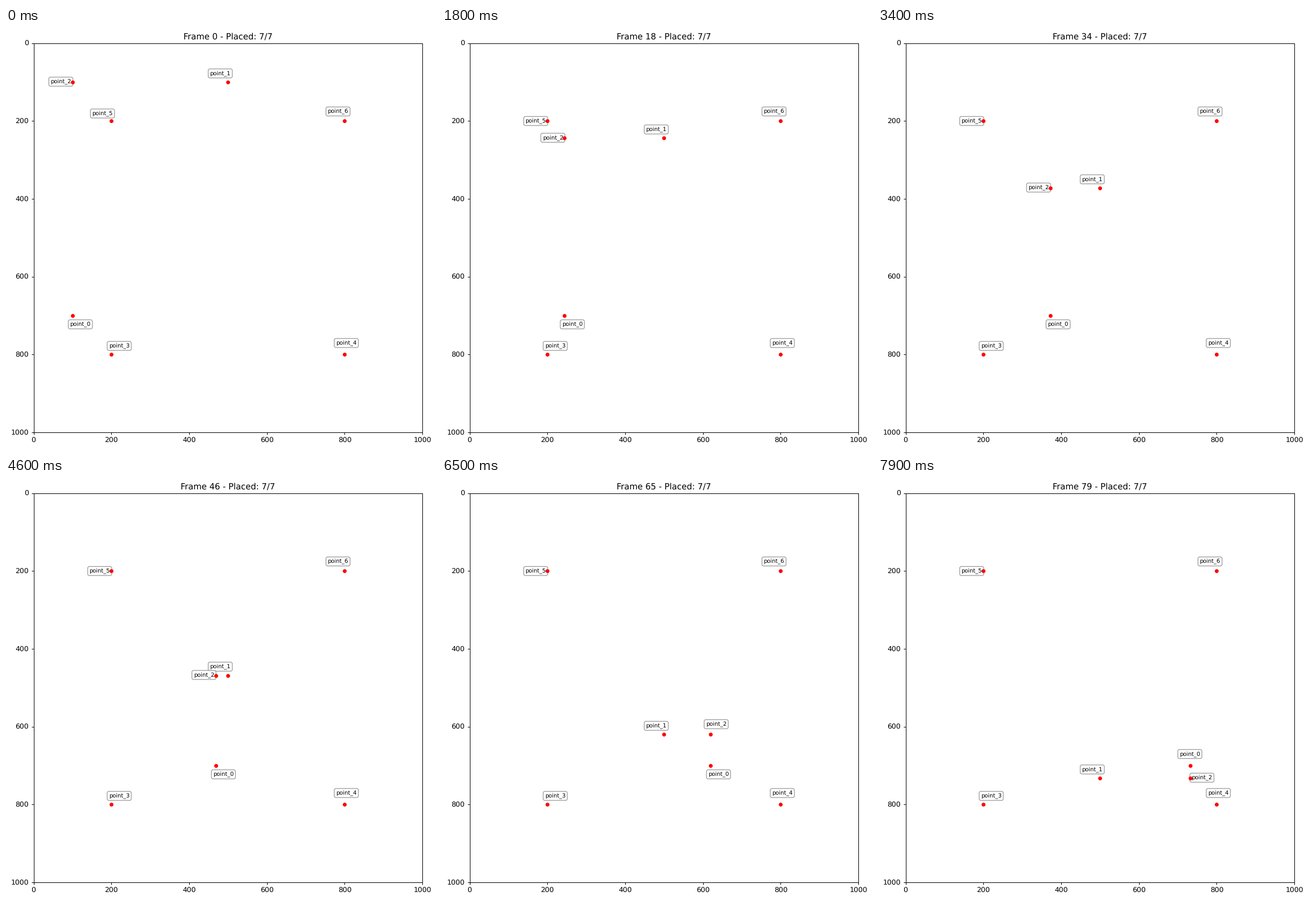
A matplotlib script for the animation above (8000 ms loop, 756x741 px).

```python
import matplotlib.pyplot as plt
import numpy as np
from matplotlib.animation import FuncAnimation

W, H, DPI = 756, 741, 88.83
LEFT, TOP, SIDE = 48.6, 26.6, 683.6
FRAMES, SPEED, RADIUS = 80, 8, 30

plt.rcParams.update({"font.family": "DejaVu Sans", "text.hinting": "none"})


class Point:
    """A dot in steady motion; its label sits on a circle around it.

    angles maps the step at which the label jumps to its new angle in degrees.
    """

    def __init__(self, start, angles, direction=(0, 0)):
        self.start = np.array(start)
        self.direction = np.array(direction)
        self.angles = angles

    def dot(self, k):
        return self.start + SPEED * k * self.direction

    def label(self, k):
        turn = max(step for step in self.angles if step <= k)
        a = np.radians(self.angles[turn])
        return self.dot(k) + RADIUS * np.array([np.cos(a), -np.sin(a)])


points = [
    Point((100, 700), {0: -48, 77: 92}, (1, 0)),
    Point((500, 100), {0: 132}, (0, 1)),
    Point((100, 100), {0: 178, 50: 62, 77: 2}, (1, 1)),
    Point((200, 800), {0: 48}),
    Point((800, 800), {0: 82}),
    Point((200, 200), {0: 140, 9: 103, 15: 180}),
    Point((800, 200), {0: 125}),
]

fig = plt.figure(figsize=((W + 0.001) / DPI, (H + 0.001) / DPI), dpi=DPI,
                 facecolor="white")
ax = fig.add_axes([LEFT / W, 1 - (TOP + SIDE) / H, SIDE / W, SIDE / H])
ax.set(xlim=(0, 1000), ylim=(1000, 0))
title = ax.set_title("", fontsize=12)

dots = ax.scatter([p.start[0] for p in points], [p.start[1] for p in points],
                  s=20, color="red", zorder=10)
box = dict(boxstyle="round,pad=0.3", facecolor="white", edgecolor="gray",
           alpha=0.8)
labels = [ax.text(0, 0, f"point_{i}", fontsize=8, ha="center", va="center",
                  bbox=box, zorder=3)
          for i in range(len(points))]


def update(k):
    dots.set_offsets([p.dot(k) for p in points])
    for p, label in zip(points, labels):
        label.set_position(p.label(k))
    title.set_text(f"Frame {k} - Placed: {len(labels)}/{len(points)}")
    return [dots, title, *labels]


anim = FuncAnimation(fig, update, frames=FRAMES, interval=100,
                     repeat=True, repeat_delay=0, blit=False)
plt.show()
```
